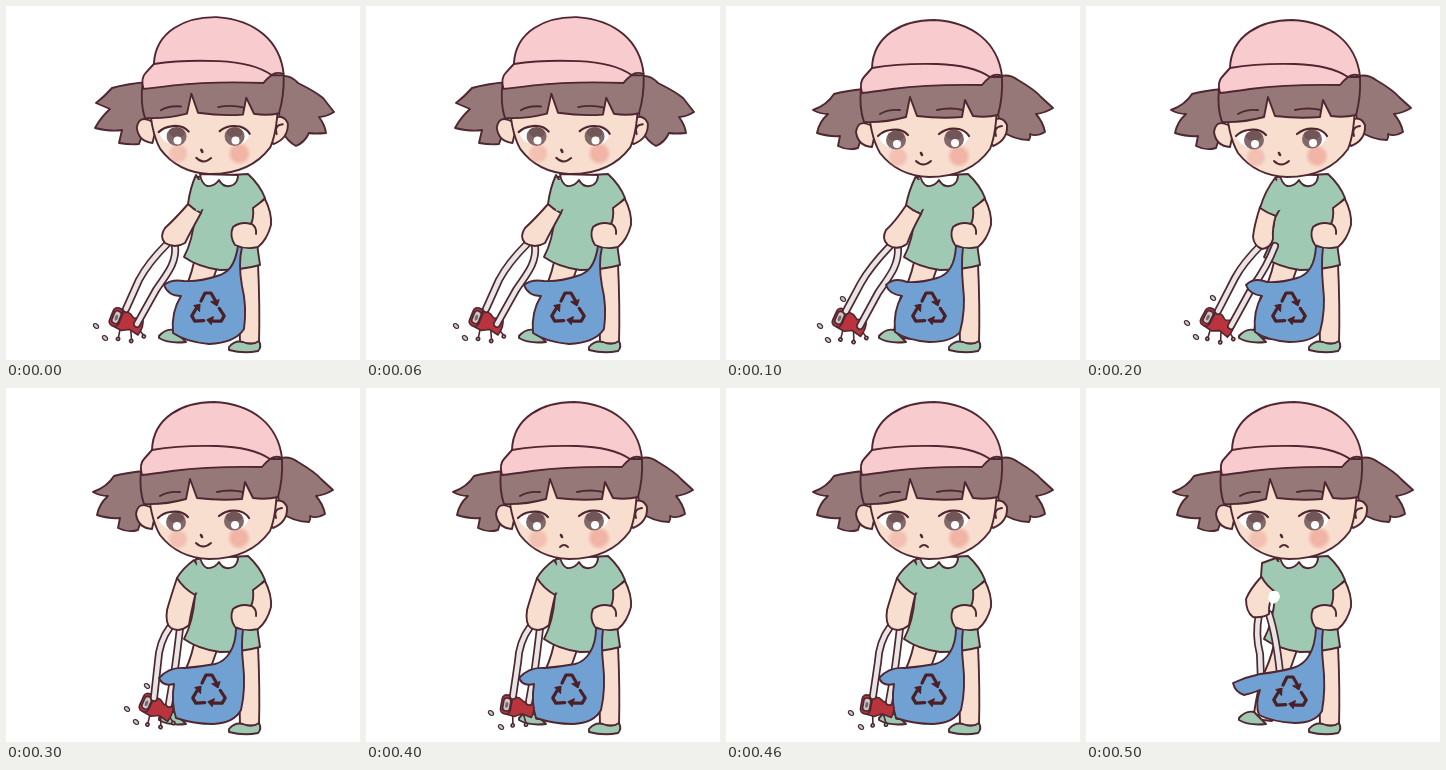
Write an HTML page that moves like this. It is 354 px wide and 354 px high and loops after 600 ms.

```html
<!DOCTYPE html>
<html lang="en">
<head>
<meta charset="utf-8">
<title>Picking up litter</title>
<style>
html, body { margin: 0; width: 100%; height: 100%; overflow: hidden; background: #fff }
svg { display: block; width: 100vw; height: 100vh; stroke: #4f2731; stroke-width: 1.9; stroke-linecap: round; stroke-linejoin: round }
.skin { fill: #f8decf }
.hair { fill: #967879 }
.hat { fill: #f8cccf }
.green { fill: #9fc9b3 }
.blue { fill: #71a1d2 }
.white { fill: #fff }
.line { fill: none }
.plain { stroke: none }
</style>
</head>
<body>
<svg viewBox="0 0 354 354">
<defs>
  <radialGradient id="blush">
    <stop offset=".6" stop-color="#efaa9c" stop-opacity=".8"/>
    <stop offset="1" stop-color="#efaa9c" stop-opacity="0"/>
  </radialGradient>
  <g id="arrow" stroke="#4a1f26">
    <path class="line" stroke-width="3.2" d="M-7-9L-3-17H3L7-10"/>
    <path fill="#4a1f26" stroke-width="1" d="M11-10L9-4L3-8Z"/>
  </g>
  <g id="eye" class="plain">
    <ellipse rx="10" ry="9.5" fill="#836869"/>
    <ellipse cy="-4" rx="8" ry="5" fill="#715557"/>
    <circle cx="1" cy="4" r="4" fill="#fff"/>
  </g>
</defs>
<!-- legs and shoes -->
<path class="skin" d="M188 256Q184 275 174 293Q170 312 167 331L186 333L211 262Z"/>
<path class="skin" d="M222 260Q235 300 234 337L253 338Q254 300 252 258Z"/>
<path class="green" d="M223 341Q229 334 237 336Q246 340 253 335Q256 341 252 345Q238 348 223 344Z"/>
<path class="green" d="M153 330Q160 322 168 324L180 336Q163 338 153 332Z"/>
<g id="grab"></g>
<path class="green" d="M190 171Q186 182 189 208Q187 234 178 251Q192 261 214 264Q236 264 254 259Q250 233 248 203L259 192Q254 179 242 168Z"/>
<g id="arm"></g>
<path class="white" d="M194 168Q195 177 201 180Q208 181 213 174Q218 183 227 179Q232 176 232 169Z"/>
<path id="bag" class="blue"/>
<g id="mark">
  <use href="#arrow"/><use href="#arrow" transform="rotate(120)"/><use href="#arrow" transform="rotate(240)"/>
</g>
<path class="skin" d="M247 202L259 193Q266 207 265 219Q261 234 252 241Q240 244 229 239Q223 230 227 221Q235 215 245 218Q248 212 247 202Z"/>
<path class="line" d="M246 218Q251 222 250 228"/>
<!-- head -->
<path id="tails" class="hair"/>
<g id="head">
  <path class="skin" d="M144 119Q132 113 130 126Q132 140 146 141L150 123Z"/>
  <path class="skin" d="M264 116Q276 108 281 119Q282 134 267 140L260 131Z"/>
  <path class="line" d="M270 130Q267 121 276 120"/>
  <path class="skin" d="M142 92Q143 128 154 147Q172 170 203 171Q244 171 264 143Q271 126 271 92Z"/>
  <circle class="plain" cx="233" cy="150" r="12" fill="url(#blush)"/>
  <circle class="plain" cx="172" cy="151" r="11" fill="url(#blush)" opacity=".7"/>
  <path class="white plain" d="M152 130Q162 123 174 126L172 142Q157 143 152 130ZM224 126Q236 122 243 130Q240 142 226 142Z"/>
  <use href="#eye" x="170" y="134"/>
  <use href="#eye" x="228" y="133"/>
  <path class="line" stroke-width="2.2" d="M152 130Q157 125 164 124Q176 122 182 129M213 128Q221 121 233 123Q240 125 243 130"/>
  <path d="M195 147L196 149" stroke-width="2.6"/>
  <path id="mouth" class="line"/>
  <path class="hair" d="M135 82Q133 102 138 116Q158 117 180 111L184 91L191 110Q215 113 236 111L239 94L247 110Q260 112 272 109Q277 91 276 71L262 71Z"/>
  <path class="line" d="M154 108Q162 103 174 104M211 104Q224 101 237 104"/>
  <path class="hat" d="M146 62C147 29 177 14 208 14C247 16 272 37 276 70Q269 67 264 71Q259 75 256 79Q205 78 166 83Q145 86 136 87Q133 76 138 71Z"/>
  <path class="line" d="M146 62Q175 57 211 58Q246 59 264 71"/>
</g>
</svg>
<script>
const $ = id => document.getElementById(id);
const path = (d, cls) => `<path class="${cls}" d="${d}"/>`;
const smile = 'M190 155Q197 162 205 155', frown = 'M194 159Q198 155 202 159';

const tailsUp = 'M140 76Q119 78 105 82Q98 90 89 97L103 103Q94 111 88 122Q104 126 115 124L112 137Q124 139 132 138L142 110ZM268 72Q281 66 291 77Q309 86 316 92L327 106Q319 111 312 111Q318 119 319 127Q308 128 302 127Q298 136 289 140Q281 136 274 124Z';
const tailsDown = 'M138 83Q119 85 108 88Q101 99 87 104Q94 108 102 108Q93 116 91 127Q104 131 114 130L112 140Q122 145 132 142L142 112ZM268 72Q282 66 292 74Q309 84 315 91L327 102Q319 107 310 108Q317 116 319 126Q310 131 304 128Q305 131 303 134Q288 134 274 124Z';

const bagOut = 'M230 240C229 260 222 269 211 272Q195 277 181 276Q168 271 160 279Q163 288 176 290Q167 304 169 326Q180 334 203 336Q226 336 234 326Q240 303 237 280Q235 258 237 241Z';
const bagFlat = 'M230 240C230 260 221 273 209 276Q193 279 178 280Q163 279 153 290Q157 299 168 296Q165 314 170 330Q188 336 207 336Q228 335 235 322Q240 300 237 275Q235 257 237 241Z';

const armLow = 'M171 190Q165 208 161 222Q159 236 165 240Q174 245 183 237Q185 224 190 204Z';
const sleeveLow = 'M188 172Q177 180 171 190Q177 200 189 207L200 190Z';

// head offset and tilt, sleeve, arm, tongs, can [x, y, angle], drops, bag
const poses = [
  { head: [1, -3], tilt: 1, tails: tailsUp, mouth: smile,
    sleeve: 'M190 169Q184 182 182 198Q188 204 195 207L202 188Z',
    arm: 'M183 197Q169 213 159 222Q153 231 159 237Q169 243 179 237Q185 225 195 207Z',
    tongs: 'M161 238Q142 257 133 274L120 303M169 240C171 258 159 270 150 284L131 318',
    can: [121, 316, 22], drops: [[90, 320], [99, 332]],
    bag: 'M232 240C229 260 222 267 211 270Q193 276 178 275Q165 273 158 279Q162 290 175 290Q165 306 167 327Q180 336 203 338Q229 337 238 323Q241 300 236 280Q232 258 236 241Z', mark: [202, 304] },
  { head: [0, 0], tails: tailsDown, mouth: smile,
    sleeve: 'M190 170Q183 184 180 199Q187 205 195 208L203 188Z',
    arm: 'M181 198Q169 216 160 224Q155 233 162 239Q171 245 181 238Q186 224 195 208Z',
    tongs: 'M164 240Q144 261 135 277L120 305M172 242C173 261 161 273 152 287L134 320',
    can: [124, 317, 24], drops: [[117, 293], [94, 320], [102, 334]],
    bag: bagOut, mark: [203, 304] },
  { head: [-2, 0], tails: tailsDown, mouth: smile,
    sleeve: 'M189 172Q179 185 174 202Q181 207 190 210L202 188Z',
    arm: 'M174 201Q168 220 167 231Q168 240 176 243Q185 242 187 233Q186 222 190 209Z',
    tongs: 'M175 239Q157 257 149 272L132 305M189 240Q181 261 167 280L145 320',
    can: [132, 317, 28], drops: [[127, 292], [101, 317], [110, 331]],
    bag: bagOut, mark: [203, 304] },
  { head: [0, 0], tails: tailsDown, mouth: smile, sleeve: sleeveLow, arm: armLow,
    tongs: 'M164 239Q153 254 152 274L148 310M174 240Q171 266 169 280L163 316',
    can: [151, 320, 24], drops: [[141, 298], [121, 321], [130, 334]],
    bag: bagFlat, mark: [203, 304] },
  { head: [0, 0], tails: tailsDown, mouth: frown, sleeve: sleeveLow, arm: armLow,
    tongs: 'M164 239Q153 254 152 274L147 308M174 240Q171 266 169 280L163 314',
    can: [152, 319, 10], drops: [[125, 325], [135, 339]],
    bag: bagFlat, mark: [203, 304] },
  { head: [0, 0], tails: tailsDown, mouth: frown,
    sleeve: 'M190 170L176 175L175 188Q181 199 191 205L202 188Z',
    arm: 'M176 188Q164 201 160 211Q160 224 167 229Q177 230 183 226Q182 211 191 204Z',
    tongs: 'M173 226Q169 247 174 266L175 292M183 226Q190 247 194 285',
    cuff: 'M184 204Q193 200 194 209Q192 216 185 216Q180 211 184 204Z',
    drops: [],
    bag: 'M230 240C229 262 221 276 207 280Q192 284 174 286Q160 289 147 295Q149 304 158 307Q167 305 174 302Q169 316 173 327Q187 334 209 335Q229 335 236 323Q240 300 237 275Q235 257 237 241Z', mark: [204, 306] }
];

function can([x, y, angle]) {
  return `<g transform="translate(${x} ${y}) rotate(${angle})" stroke-width="1.6">
    <path class="line" d="M-4 8L-2 18M7 7L11 15M15 3L20 6"/>
    <g fill="#bbb"><circle cx="-2" cy="19" r="1.6"/><circle cx="11" cy="16" r="1.6"/><circle cx="21" cy="7" r="1.6"/></g>
    <path fill="#b9343d" d="M-11-10L0-9L5-6L13-10Q18-2 15 8L5 6L-2 10L-11 9Z"/>
    <rect x="-17" y="-10" width="10" height="19" rx="4.5" fill="#b9343d"/>
    <rect x="-15" y="-7" width="7" height="13" rx="3" fill="#cbc5c5"/>
    <ellipse class="plain" cx="-11.5" rx="1.5" ry="3" fill="#75686b"/></g>`;
}

const drop = ([x, y]) =>
  `<ellipse rx="2" ry="3" transform="translate(${x} ${y}) rotate(-50)" fill="#b9cbd3" stroke-width="1.2"/>`;

function draw(p) {
  const tongs = `<path class="line" stroke-width="8" d="${p.tongs}"/>
    <path class="line" stroke="#e8e5e5" stroke-width="4.6" d="${p.tongs}"/>`;
  $('grab').innerHTML = (p.can ? can(p.can) : '') + p.drops.map(drop).join('');
  $('arm').innerHTML = tongs + path(p.arm, 'skin') + path(p.sleeve, 'green') +
    path('M191 174L190 205L208 200L205 174Z', 'plain green') +
    (p.cuff ? path(p.cuff, 'white plain') : '');
  $('bag').setAttribute('d', p.bag);
  $('mark').setAttribute('transform', `translate(${p.mark})`);
  $('tails').setAttribute('d', p.tails);
  $('tails').setAttribute('transform', `translate(${p.head[0]})`);
  $('head').setAttribute('transform', `translate(${p.head}) rotate(${p.tilt || 0} 203 110)`);
  $('mouth').setAttribute('d', p.mouth);
}

let shown = -1;
function tick() {
  const i = Math.floor(performance.now() % 600 / 100);
  if (i !== shown) draw(poses[shown = i]);
  requestAnimationFrame(tick);
}
tick();
</script>
</body>
</html>
```
